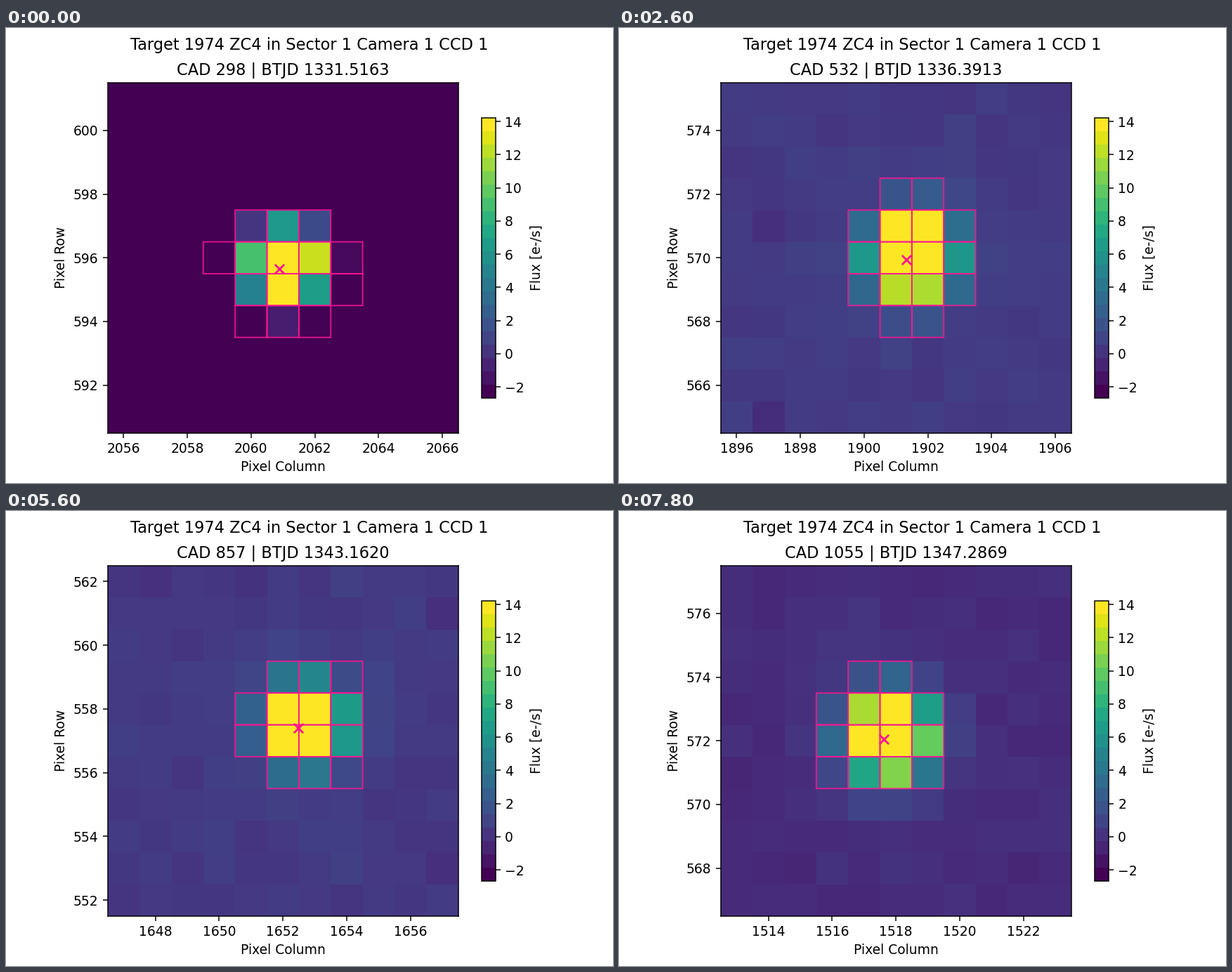
Recreate the animation shown at these times as a matplotlib script. Size 864 by 648 pixels, loop 8000 ms.

```python
import matplotlib.pyplot as plt
import numpy as np
from matplotlib.animation import FuncAnimation
from matplotlib.cm import ScalarMappable
from matplotlib.colors import Normalize
from matplotlib.patches import Rectangle

DPI, FRAMES, STEP_MS = 135, 40, 200
HALF = 5                       # the cutout is 11 x 11 pixels
PINK = "deeppink"
NAME = "1974 ZC4"

X, Y = np.meshgrid(np.arange(-HALF, HALF + 1), np.arange(-HALF, HALF + 1))

# Key points of the track and of the image sharpness.
KEY_CAD = np.array([298, 442, 532, 713, 857, 965, 1055])
KEY_COL = np.array([2060.89, 1963.03, 1901.32, 1761.58, 1652.49, 1577.51, 1517.61])
KEY_ROW = np.array([595.655, 580.0, 569.94, 550.78, 557.4, 565.03, 572.06])
KEY_SHARP = np.array([0.86, 1.09, 0.8, 1.1, 1.1, 0.6, 0.73])

# Over-subtracted background stars: column, row, depth.
STARS = [(1958.6, 579.6, 1.9), (1766.4, 549.9, 4.5)]


def cadence(i):
    """Every 18th exposure, with a pause between the two orbits."""
    return 298 + 18 * i + (55 if i > 18 else 0)


def btjd(cad):
    return 1331.516349 + (cad - 298) * 0.02083302


def hermite(t, ts, vs):
    slope = np.gradient(vs, ts)
    k = min(np.searchsorted(ts, t, side="right") - 1, len(ts) - 2)
    h = ts[k + 1] - ts[k]
    u = (t - ts[k]) / h
    return ((1 + 2 * u) * (1 - u) ** 2 * vs[k] + u * (1 - u) ** 2 * h * slope[k]
            + u * u * (3 - 2 * u) * vs[k + 1] + u * u * (u - 1) * h * slope[k + 1])


def sky_level(cad):
    """Slow arch in time with two short dips."""
    dips = sum(np.exp(-((cad - c) / 25) ** 2) for c in (298, 965))
    return 0.3 - 0.9 * ((cad - 690) / 370) ** 2 - 3.8 * dips


def flux_map(i, cad, col, row):
    """Sky, noise, background stars and the target's spread of light."""
    c0, r0 = round(col), round(row)
    flux = sky_level(cad) + np.random.default_rng(i).normal(0, 0.18, X.shape)
    for sc, sr, depth in STARS:
        d2 = (c0 + X - sc) ** 2 + (r0 + Y - sr) ** 2
        flux -= depth * np.exp(-d2 / 3)
    sharp = np.interp(cad, KEY_CAD, KEY_SHARP)
    d2 = offset_sq(col, row)
    return flux + np.exp(2.4 + 1.4 * sharp - sharp * d2) + np.exp(-d2 / 6)


def offset_sq(col, row):
    """Squared distance of each pixel from the centre of the light."""
    return ((X + round(col) - col - 0.18) ** 2
            + (Y + round(row) - row - 0.12) ** 2)


fig, ax = plt.subplots(figsize=(6.4, 4.8), dpi=DPI)
norm = Normalize(-2.66, 14.23)
image = ax.imshow(np.zeros(X.shape), origin="lower", cmap="viridis", norm=norm)
fig.colorbar(ScalarMappable(norm, plt.get_cmap("viridis", 21)), ax=ax,
             shrink=0.8, label="Flux [e-/s]")
ax.set(xlabel="Pixel Column", ylabel="Pixel Row")
fig.suptitle(f"Target {NAME} in Sector 1 Camera 1 CCD 1")

boxes = [ax.add_patch(Rectangle((0, 0), 1, 1, fill=False, ec=PINK, lw=1,
                                alpha=0.85, snap=False)) for _ in range(20)]
cross = ax.scatter([0], [0], marker="x", s=50, c=PINK, zorder=3)


def draw(i):
    cad = cadence(i)
    col = hermite(cad, KEY_CAD, KEY_COL)
    row = hermite(cad, KEY_CAD, KEY_ROW)
    c0, r0 = round(col), round(row)

    edge = HALF + 0.5
    xlim, ylim = (c0 - edge, c0 + edge), (r0 - edge, r0 + edge)
    image.set_data(flux_map(i, cad, col, row))
    image.set_extent(xlim + ylim)
    ax.set(xlim=xlim, ylim=ylim)
    ax.set_title(f"CAD {cad} | BTJD {btjd(cad):.4f}")

    inside = offset_sq(col, row) < 4.65
    for box in boxes:
        box.set_visible(False)
    for box, dx, dy in zip(boxes, X[inside], Y[inside]):
        box.set_xy((c0 + dx - 0.5, r0 + dy - 0.5))
        box.set_visible(True)
    cross.set_offsets([(col, row)])


anim = FuncAnimation(fig, draw, frames=FRAMES, interval=STEP_MS,
                     init_func=lambda: draw(0), repeat=True, repeat_delay=0)
plt.show()
```
